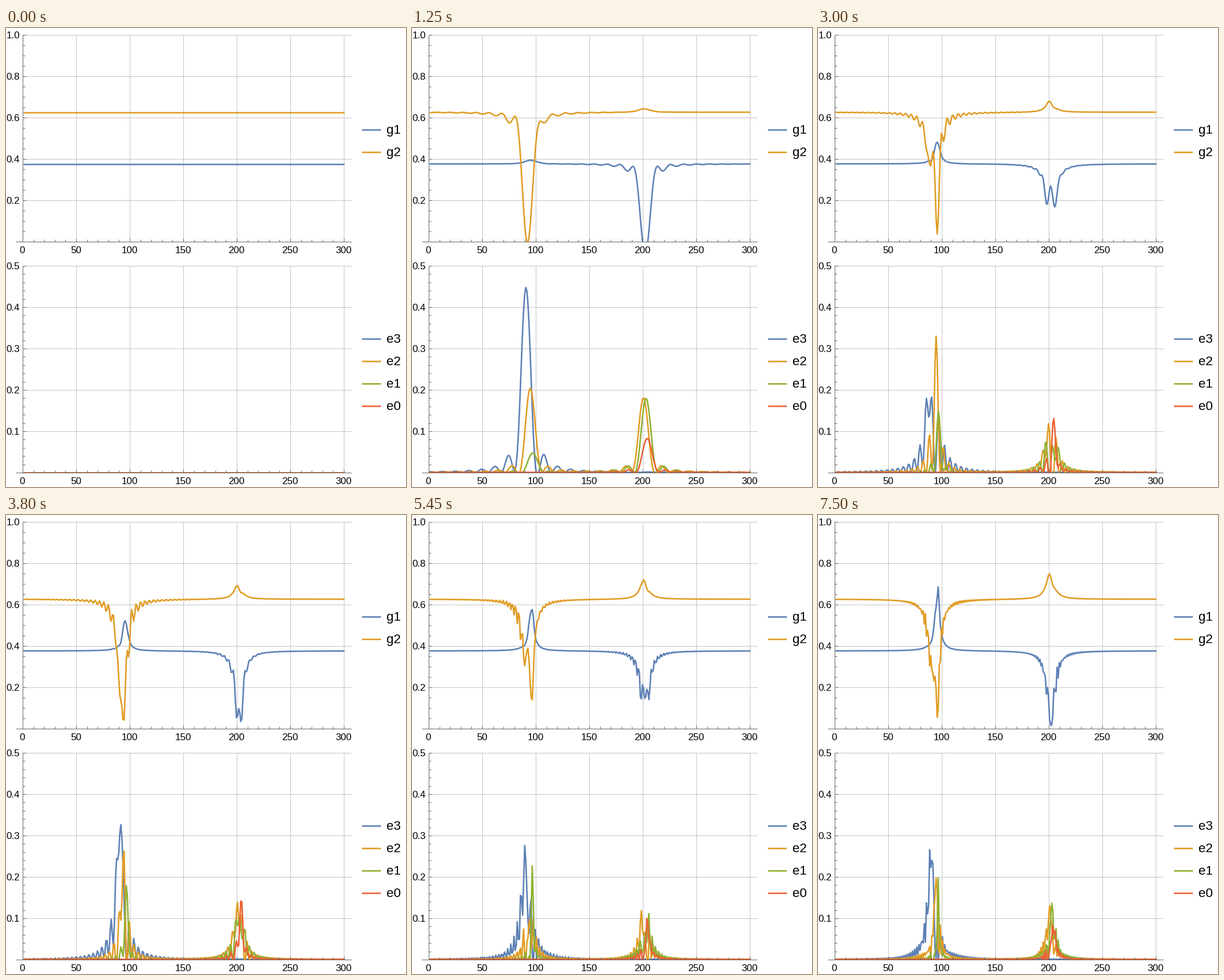
These frames come from a looping animation (695x799 px, 7.55 s). A matplotlib script:

```python
import numpy as np
import matplotlib.pyplot as plt
from matplotlib.animation import FuncAnimation
from matplotlib.collections import LineCollection
from matplotlib.patches import Rectangle

W, H, DPI = 695, 799, 100
PX = 72 / DPI
FRAMES, INTERVAL = 151, 50
BLUE, ORANGE, GREEN, RED = "#5E81B5", "#E19C24", "#8FB032", "#EB6235"

# Two ground and four excited levels; GHz, ns, rad/ns
GAMMA = 2 * np.pi * 0.0097946
RABI = 10 * GAMMA
DT = 0.2
SCAN = np.linspace(-2.5, 2.5, 301)
GROUND = (0.8858, -0.8858)
EXCITED = (0.0, 0.01581, 0.05015, 0.10848)
# ground, excited, line strength, branching ratio of the decay
LINES = [
    (0, 0, 1 / 6, 1), (0, 1, 5 / 12, 5 / 6), (0, 2, 5 / 12, 1 / 2),
    (1, 1, 1 / 20, 1 / 6), (1, 2, 1 / 4, 1 / 2), (1, 3, 7 / 10, 1),
]


def rate_matrix():
    """Bloch equations for populations and optical coherences."""
    m = np.zeros((len(SCAN), 18, 18))
    for n, (g, k, strength, branch) in enumerate(LINES):
        e, re, im = 2 + k, 6 + 2 * n, 7 + 2 * n
        rabi = RABI * np.sqrt(strength)
        delta = 2 * np.pi * (SCAN - GROUND[g] + EXCITED[k])
        m[:, re, re] = m[:, im, im] = -GAMMA / 2
        m[:, re, im] = delta
        m[:, im, re] = -delta
        m[:, im, g] = rabi / 2
        m[:, im, e] = -rabi / 2
        m[:, g, im] -= rabi
        m[:, e, im] += rabi
        m[:, g, e] += GAMMA * branch
        m[:, e, e] -= GAMMA * branch
    return m


def expm(a, squarings=8, order=8):
    a = a / 2 ** squarings
    term = np.broadcast_to(np.eye(a.shape[-1]), a.shape)
    total = term.copy()
    for n in range(1, order + 1):
        term = term @ a / n
        total = total + term
    for _ in range(squarings):
        total = total @ total
    return total


def solve():
    step = expm(rate_matrix() * DT)
    state = np.zeros((len(SCAN), 18, 1))
    state[:, 0], state[:, 1] = 3 / 8, 5 / 8
    out = [state[:, :6, 0]]
    for _ in range(FRAMES - 1):
        state = step @ state
        out.append(state[:, :6, 0])
    return np.array(out)


pops = solve()

fig = plt.figure(figsize=(W / DPI, H / DPI), dpi=DPI, facecolor="white")
ax = fig.add_axes([0, 0, 1, 1])
ax.set_xlim(0, W)
ax.set_ylim(H, 0)
ax.axis("off")

X0, XSTEP, LEFT, RIGHT = 28.5, 1.86, 17, 599.5
xs = X0 + XSTEP * np.arange(1, len(SCAN) + 1)


def label(x, y, s, size, ha):
    ax.text(x, y, s, fontsize=size * PX, family="Liberation Sans",
            color="black", ha=ha, va="baseline")


def strokes(segments, color, z):
    ax.add_collection(LineCollection(segments, colors=color, linewidths=PX,
                                     zorder=z, capstyle="butt"))


def pixel(v):
    return np.floor(v) + 0.5


def panel(top, vmax, major, per_major, names, colors, legend_y):
    base, height = top + 360, 360
    grid = []
    axes = [[(LEFT, base), (RIGHT, base)], [(X0, top), (X0, base)]]
    for n in range(31):
        x = pixel(X0 + 10 * XSTEP * n)
        big = n % 5 == 0
        axes.append([(x, base), (x, base - (6 if big else 4))])
        if big:
            grid.append([(x, top), (x, base)])
            label(x, base + 20.5, str(10 * n), 17, "center")
    count = round(vmax / major) * per_major
    for n in range(1, count + 1):
        y = pixel(base - height * n / count)
        big = n % per_major == 0
        axes.append([(X0, y), (X0 + (6 if big else 4), y)])
        if big:
            grid.append([(X0, y), (RIGHT, y)])
            label(24, y + 6, f"{vmax * n / count:.1f}", 17, "right")
    strokes(grid, "#C4C4C4", 1)
    strokes(axes, "#666666", 4)

    clip = Rectangle((LEFT, top - 0.5), RIGHT - LEFT, height + 0.5,
                     transform=ax.transData)
    curves = []
    for n, (name, color) in enumerate(zip(names, colors)):
        y = legend_y + 39 * n
        style = dict(color=color, lw=2.6 * PX, solid_capstyle="butt")
        ax.plot([617.5, 651], [y, y], **style)
        label(661, y + 7, name, 22.4, "left")
        line, = ax.plot([], [], zorder=3, solid_joinstyle="round", **style)
        line.set_clip_path(clip)
        curves.append((line, base, height / vmax))
    return curves


curves = panel(11.5, 1.0, 0.2, 4, ["g1", "g2"], [BLUE, ORANGE], 177)
curves += panel(413.5, 0.5, 0.1, 5, ["e3", "e2", "e1", "e0"],
                [BLUE, ORANGE, GREEN, RED], 541)
ORDER = (0, 1, 5, 4, 3, 2)


def draw(i):
    for (line, base, scale), level in zip(curves, ORDER):
        line.set_data(xs, base - scale * pops[i, :, level])
    return [c[0] for c in curves]


anim = FuncAnimation(fig, draw, frames=FRAMES, init_func=lambda: draw(0),
                     interval=INTERVAL, repeat=True, repeat_delay=0, blit=False)
plt.show()
```
